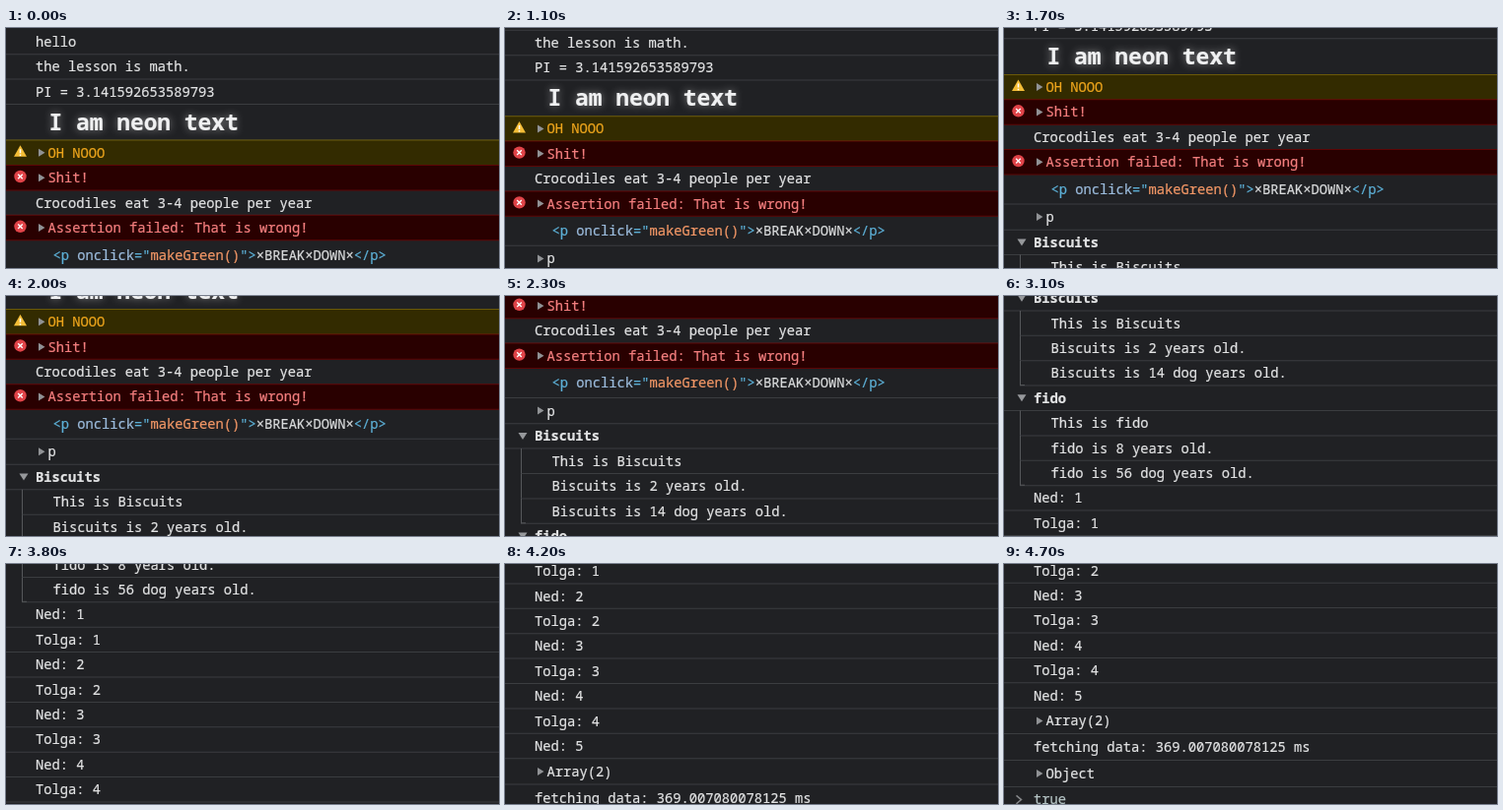
An HTML page that plays this animation: 500 px wide and 244 px high, repeating every 5.2 s.

```html
<!DOCTYPE html>
<html lang="en">
<head>
<meta charset="utf-8">
<title>Console scroll</title>
<style>
html, body { margin: 0; width: 100%; height: 100%; overflow: hidden; background: #202124; }
svg { display: block; width: 500px; height: 244px; }
text {
  font: 13.75px "Noto Sans Mono", "DejaVu Sans Mono", monospace;
  fill: #e2e3e4; stroke: currentColor; color: #e2e3e4; stroke-width: .22px; white-space: pre;
}
.bold { font-weight: 700; }
.neon { font-size: 22.9px; font-weight: 700; fill: #f0f1f2; filter: drop-shadow(0 0 4px #ffffff70); }
.warn { fill: #eda51c; color: #eda51c; }
.error { fill: #f47f7f; color: #f47f7f; }
.input { fill: #b4c3c4; color: #b4c3c4; }
.tag { fill: #5db0d7; color: #5db0d7; stroke: #5db0d7; }
.attr { fill: #9bbbdc; stroke: #9bbbdc; }
.value { fill: #f29766; stroke: #f29766; }
.plain { fill: #d8dadb; stroke: #d8dadb; }
</style>
</head>
<body>
<svg viewBox="0 0 500 244"><g id="log"></g></svg>
<script>
const ROW = 25.4, LOOP = 5200;
const skins = {
  warn: { bg: '#332b00', line: '#6b5a08' },
  error: { bg: '#290000', line: '#5c0505' }
};

let y = 1.3, markup = '';

const path = (d, fill) => `<path d="${d}" fill="${fill}"/>`;
const rightArrow = c => path(`M33 ${c - 4}l6.5 4-6.5 4z`, '#909295');
const downArrow = c => path(`M13.5 ${c - 3.5}h9l-4.5 7z`, '#96989b');
const icons = {
  warn: c => path(`M14.5 ${c - 7.5}l6.5 11.5h-13z`, '#f4bd36') +
    `<path d="M14.5 ${c - 3.5}v4m0 1.2v1.5" stroke="#fff" stroke-width="1.5"/>`,
  error: c => `<circle cx="14.5" cy="${c - 1.2}" r="6.2" fill="#e04348"/>` +
    `<path d="M12.2 ${c - 3.5}l4.6 4.6m0-4.6l-4.6 4.6" stroke="#fff" stroke-width="1.4"/>`
};

function row(text, { x = 30, h = ROW, kind = '', arrow, nested } = {}) {
  const c = y + h / 2, skin = skins[kind];
  const base = c + (kind === 'neon' ? 8 : 5);
  const left = nested ? 16 : 0;
  if (skin) {
    markup += `<rect y="${y}" width="500" height="${h}" fill="${skin.bg}"/>` +
      path(`M0 ${y - .5}h500v1h-500z`, skin.line) + icons[kind](c);
  }
  if (nested) markup += path(`M16 ${y}h1v${h}h-1z`, '#56585b');
  markup += path(`M${left} ${y + h - .5}h500v1h-500z`, skin ? skin.line : '#3b3d40');
  if (arrow) markup += arrow(c);
  markup += `<text class="${kind}" x="${x}" y="${base}">${text}</text>`;
  y += h;
}

function group(name, age) {
  row(name, { kind: 'bold', arrow: downArrow });
  for (const s of [`This is ${name}`, `${name} is ${age} years old.`, `${name} is ${age * 7} dog years old.`])
    row(s, { x: 47.5, nested: true });
  markup += path(`M16 ${y - 1}h5v1h-5z`, '#56585b');
}

const span = (cls, s) => `<tspan class="${cls}">${s}</tspan>`;
const folded = { x: 42.5, arrow: rightArrow };

row('hello');
row('the lesson is math.');
row('PI = ' + Math.PI);
row('I am neon text', { x: 43.5, h: 36.6, kind: 'neon' });
row('OH NOOO', { ...folded, kind: 'warn' });
row('Shit!', { ...folded, kind: 'error' });
row('Crocodiles eat 3-4 people per year');
row('Assertion failed: That is wrong!', { ...folded, kind: 'error' });
row(span('tag', '&lt;p ') + span('attr', 'onclick') + span('tag', '="') + span('value', 'makeGreen()') +
  span('tag', '"&gt;') + span('plain', '×BREAK×DOWN×') + span('tag', '&lt;/p&gt;'), { x: 47.5, h: 30 });
row('p', { ...folded, h: 26.2 });
group('Biscuits', 2);
group('fido', 8);
for (let n = 1; n <= 5; n++) {
  row('Ned: ' + n);
  if (n < 5) row('Tolga: ' + n);
}
row('Array(2)', { ...folded, h: 26.4 });
row('fetching data: 369.007080078125 ms', { h: 27 });
row('Object', { ...folded, h: 26.8 });
markup += `<path d="M12.5 ${y + 9}l5 4.2-5 4.2" fill="none" stroke="#85878a" stroke-width="1.5"/>`;
row('true', { h: 26, kind: 'input' });

const log = document.getElementById('log');
log.innerHTML = markup;

// Scroll keys: time in ms, offset in px, speed in px per 100 ms
const keys = [
  [700, 0, 4.5], [1100, 24.4, 6.4], [1700, 66.7, 9.8], [2300, 142.2, 15],
  [3100, 282.4, 20], [3800, 436.3, 19.5], [4700, 557.5, 5]
];

function scrollAt(t) {
  if (t <= keys[0][0]) return 0;
  const i = keys.findIndex(k => t < k[0]);
  if (i < 0) return keys.at(-1)[1];
  const [t0, p0, v0] = keys[i - 1], [t1, p1, v1] = keys[i];
  const u = (t - t0) / (t1 - t0), d = (t1 - t0) / 100, w = 1 - u;
  return w * w * ((1 + 2 * u) * p0 + u * d * v0) + u * u * ((3 - 2 * u) * p1 - w * d * v1);
}

const start = performance.now();
function draw() {
  const t = (performance.now() - start) % LOOP;
  const step = Math.floor(t / 100) * 100;
  log.setAttribute('transform', `translate(0 ${-scrollAt(step).toFixed(2)})`);
  requestAnimationFrame(draw);
}
draw();
</script>
</body>
</html>
```
